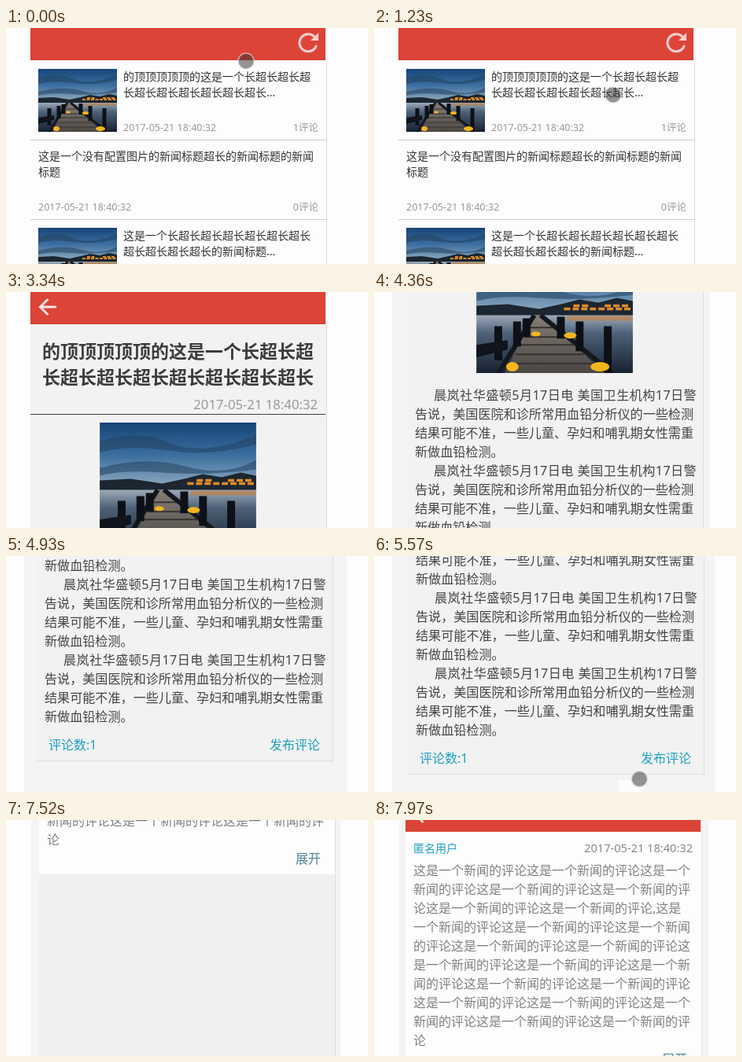
An HTML page that plays this animation: 460x300 px, repeating every 8000 ms.

```html
<!DOCTYPE html>
<html lang="zh-CN">
<head>
<meta charset="utf-8">
<title>新闻</title>
<style>
html, body { margin: 0; height: 100%; overflow: hidden; background: #fdfdfd; }
svg { display: block; width: 460px; height: 300px; font-family: "Noto Sans", "Noto Sans CJK SC", "Noto Sans CJK", sans-serif; }
</style>
</head>
<body>
<svg viewBox="0 0 460 300">
  <defs>
    <linearGradient id="sky" x2="0" y2="1">
      <stop stop-color="#174476"/><stop offset=".5" stop-color="#3b6d9f"/><stop offset="1" stop-color="#8ea9bd"/>
    </linearGradient>
    <linearGradient id="water" x2="0" y2="1">
      <stop stop-color="#aab6c2"/><stop offset=".35" stop-color="#4d6178"/><stop offset="1" stop-color="#18222f"/>
    </linearGradient>
    <linearGradient id="deck" x2="0" y2="1">
      <stop stop-color="#857d76"/><stop offset="1" stop-color="#4b4744"/>
    </linearGradient>
    <symbol id="photo" viewBox="0 0 100 80">
      <rect width="100" height="41" fill="url(#sky)"/>
      <path d="M0 12Q25 4 45 13T100 8V14Q70 22 45 18T0 19ZM0 29Q30 21 55 28T100 24V30Q65 34 40 32T0 34Z" fill="#24435f" opacity=".55"/>
      <rect y="41" width="100" height="39" fill="url(#water)"/>
      <path d="M0 37L20 36 40 39 54 36 66 33 78 35 90 32 100 34V43H0Z" fill="#1c2630"/>
      <path d="M56 39H100M62 37H72M82 37H97" stroke="#e08a28" stroke-width="1.8" stroke-dasharray="4 1.5"/>
      <path d="M58 45H100" stroke="#c47d38" stroke-width="3" opacity=".6"/>
      <path d="M37 43H41L82 80H18Z" fill="url(#deck)"/>
      <path d="M34 51H50M31 57H57M28 62H62M25 68H69M21 74H76" stroke="#35332f"/>
      <path d="M37 43L14 80M41 43L87 80" stroke="#14181d" stroke-width="3"/>
      <path d="M14 50V72M26 47V63M32 45V57M54 44V58M66 47V66M84 50V80" stroke="#0d1117" stroke-width="5"/>
      <path d="M0 62L20 59V65L0 70Z" fill="#10151c"/>
      <g fill="#f4b51e"><ellipse cx="38" cy="55" rx="3" ry="1.5"/><ellipse cx="60" cy="56" rx="4" ry="2"/><ellipse cx="23" cy="76" rx="4" ry="3"/><ellipse cx="79" cy="76" rx="6" ry="3"/></g>
    </symbol>
  </defs>
  <rect id="trail" height="300" fill="#f4f4f4"/>
  <g id="phone">
    <g id="list"></g>
    <g id="article"></g>
    <g id="comments"></g>
    <path d="M407.5 41V674" stroke="#dedede"/>
  </g>
  <rect id="patch" x="310" y="285" width="31" height="15" fill="#fcfcfc"/>
  <circle id="touch" r="10" fill="#323232" fill-opacity=".52" stroke="#ddd" stroke-opacity=".65" stroke-width="1.5"/>
</svg>
<script>
const $ = id => document.getElementById(id);
const TEAL = '#1ca0c0', DATE = '2017-05-21 18:40:32';

// y is the middle of the line
const text = (s, x, y, size, fill, extra = '') =>
  `<text x="${x}" y="${y + size * .37}" font-size="${size}" fill="${fill}" ${extra}>${s}</text>`;
const right = (s, x, y, size, fill) => text(s, x, y, size, fill, 'text-anchor="end"');
const rect = (x, y, w, h, fill) => `<rect x="${x}" y="${y}" width="${w}" height="${h}" fill="${fill}"/>`;
const photo = (x, y, w, h) => `<use href="#photo" x="${x}" y="${y}" width="${w}" height="${h}"/>`;
const line = y => rect(31, y, 376, 1, '#ccc');
const page = fill => rect(31, 0, 376, 674, fill) + rect(31, 0, 375, 41, '#dc4437');
const back = '<path d="M64 19H44M53.5 9L43.5 19L53.5 29" fill="none" stroke="#f8e4e2" stroke-width="3"/>';

function newsItem(top, lines, count, hasPhoto) {
  const x = hasPhoto ? 149 : 41;
  return (hasPhoto ? photo(41, top + 10, 100, 80) : '') +
    lines.map((s, i) => text(s, x, top + 20 + i * 20, 14, '#333')).join('') +
    text(DATE, x, top + 84, 12.5, '#999') +
    right(count + '评论', 397, top + 84, 12.5, '#999') + line(top + 100);
}

$('list').innerHTML = page('#fdfdfd') +
  '<path d="M393 12.5A11 11 0 1 0 394.5 22" fill="none" stroke="#f3cfca" stroke-width="3"/><path d="M397 6V16H387Z" fill="#f3cfca"/>' +
  newsItem(42, ['的顶顶顶顶顶的这是一个' + '长超'.repeat(3), '长超'.repeat(6) + '长...'], 1, true) +
  newsItem(143, ['这是一个没有配置图片的新闻标题超长的新闻标题的新闻', '标题'], 0, false) +
  newsItem(244, ['这是一个' + '长超'.repeat(6) + '长', '超长'.repeat(4) + '的新闻标题...'], 0, true);

const story = [
  '晨岚社华盛顿5月17日电 美国卫生机构17日警',
  '告说，美国医院和诊所常用血铅分析仪的一些检测',
  '结果可能不准，一些儿童、孕妇和哺乳期女性需重',
  '新做血铅检测。'
];
const paragraph = top => story.map((s, i) =>
  text(s, i ? 41 : 65, top + i * 24, 16.1, '#444', i ? '' : 'letter-spacing=".45"')).join('');

$('article').innerHTML = page('#f2f2f2') + back +
  ['的顶顶顶顶顶的这是一个长超长超', '长超'.repeat(7) + '长'].map((s, i) =>
    text(s, 46, 75 + i * 33, 23, '#3c3c3c', 'font-weight="bold"')).join('') +
  right(DATE, 396, 143, 16.7, '#999') + rect(31, 155, 375, 1, '#444') +
  photo(119, 166, 199, 159) +
  [353, 449, 545].map(paragraph).join('') +
  text('评论数:1', 46, 653, 16, TEAL) + right('发布评论', 391, 653, 16, TEAL) +
  rect(31, 673, 376, 1, '#ddd');

const phrase = '这是一个新闻的评论';
const comment = phrase.repeat(7) + ',' + phrase.repeat(15);

$('comments').innerHTML = page('#f0f0f0') + back + rect(31, 41, 376, 309, '#fdfdfd') +
  text('匿名用户', 41, 62, 14, TEAL) + right(DATE, 396, 62, 14.6, '#888') +
  comment.match(/.{1,22}/g).map((s, i) => text(s, 41, 90 + i * 24, 16, '#808080')).join('') +
  right('展开', 389, 330, 16, '#4a8494') +
  rect(31, 626, 375, 46, '#000') + rect(34, 629, 309, 40, '#fff') + rect(345, 629, 58, 40, TEAL) +
  text('写评论', 39, 648, 16, '#757575') + right('300', 339, 663, 12.5, '#888') +
  text('发送', 357, 651.5, 16, '#fff');

const ticks = [0, 120, 270, 390, 540, 660, 810, 930, 1080, 1230, 1540, 1840, 1990, 2140, 2290, 2410,
  2530, 2650, 2770, 2920, 3040, 3190, 3340, 4120, 4240, 4360, 4480, 4630, 4780, 4930, 5080, 5200,
  5350, 5500, 5640, 5780, 5930, 6240, 6540, 6690, 7280, 7400, 7540, 7690, 7830, 7970];

// [time, x, y]
const pan = [[0, 0, 0], [3340, 0, 0], [4120, 3, -50], [4360, 11, -222], [4630, 10, -340], [4930, 8, -413],
  [5080, 10, -410], [5350, 12, -396], [6690, 12, -396], [7280, 12, -335], [7970, 9, -26]];
const touch = [[0, 305, 42], [270, 269, 69], [810, 380, 21], [1080, 362, 35], [1230, 304, 85], [1540, 304, 85],
  [1990, 392, 12], [2290, 271, 180], [2410, 257, 225], [2770, 293, 275], [3190, 320, 296],
  [5200, 325, 295], [5930, 355, 267], [6240, 355, 267], [6540, 308, 208]];

function at(keys, t) {
  const i = keys.findIndex(k => k[0] > t);
  if (i < 0) return keys[keys.length - 1].slice(1);
  const a = keys[i - 1], b = keys[i], p = (t - a[0]) / (b[0] - a[0]);
  return [a[1] + (b[1] - a[1]) * p, a[2] + (b[2] - a[2]) * p];
}
const show = (id, on) => $(id).style.display = on ? '' : 'none';

function draw() {
  const now = performance.now() % 8000;
  const t = ticks.filter(k => k <= now).pop();
  const [dx, dy] = at(pan, t).map(Math.round);
  $('phone').setAttribute('transform', `translate(${dx} ${dy})`);
  $('touch').setAttribute('transform', `translate(${at(touch, t)})`);

  show('list', t < 1540);
  show('article', t >= 1540 && t < 6240);
  show('comments', t >= 6240);
  show('touch', t < 3340 || t >= 5200 && t < 6690);
  show('patch', t >= 5500 && t < 7280);
  show('trail', t >= 4120);

  const left = t < 7400 ? 23 : 32, end = t < 4480 ? 427 : t < 7400 ? 433 : 425;
  $('trail').setAttribute('x', left);
  $('trail').setAttribute('width', end - left);
  requestAnimationFrame(draw);
}
draw();
</script>
</body>
</html>
```
